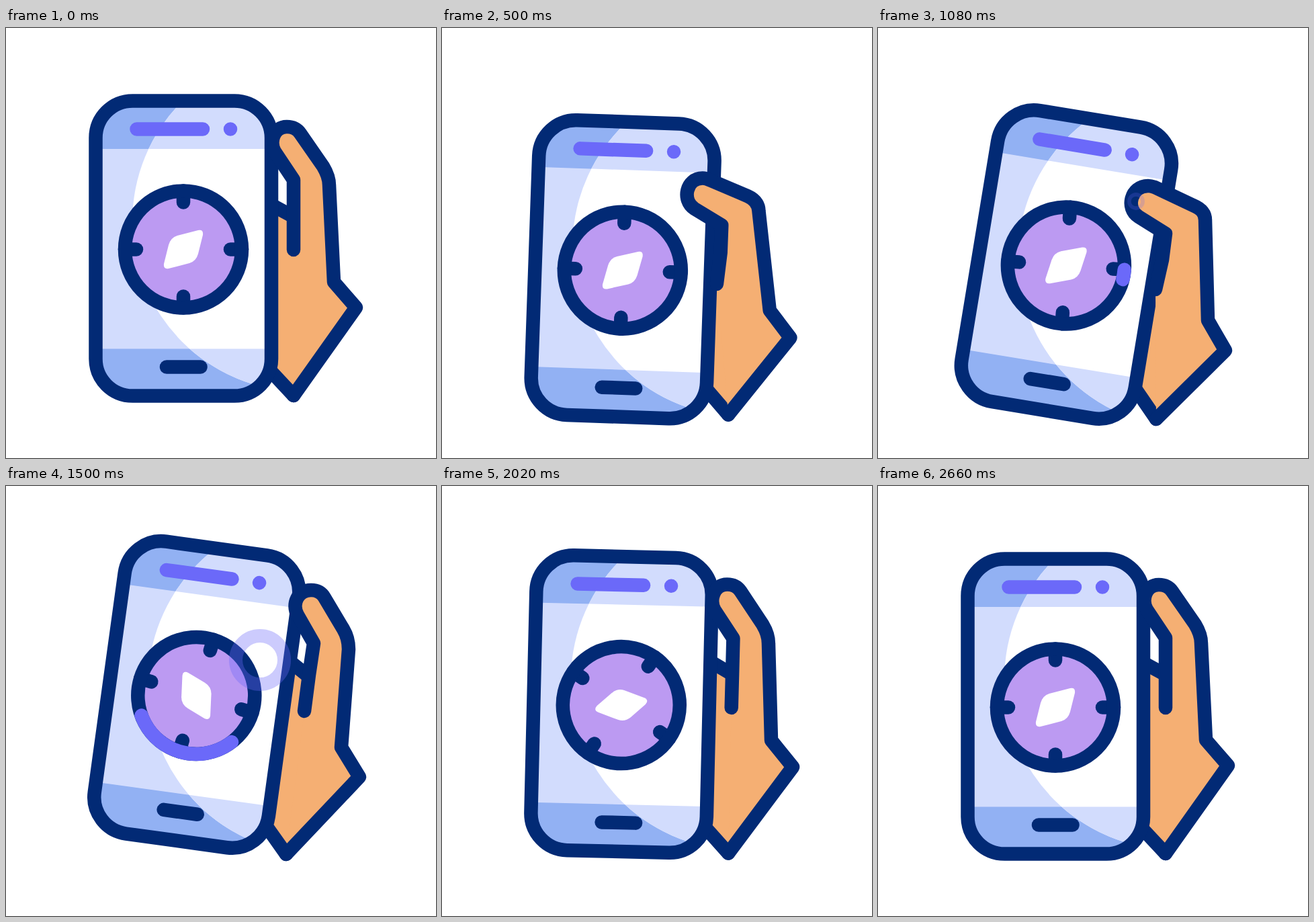
Animation, 640 px wide and 640 px high, one loop 2.82 s. Source, as an HTML page without scripts:

```html
<!DOCTYPE html>
<html lang="en">
<head>
<meta charset="utf-8">
<title>Phone compass</title>
<style>
  @property --head { syntax: "<number>"; inherits: false; initial-value: 0; }
  @property --tail { syntax: "<number>"; inherits: false; initial-value: 0; }

  :root {
    --navy: #022a75;
    --violet: #6b69f9;
    --skin: #f5af73;
    --pale: #d2dcfd;
    --blue: #92b1f3;
  }
  html, body { margin: 0; height: 100%; overflow: hidden; background: #fff; }
  svg { display: block; width: 100%; height: 100%; }

  .line { fill: none; stroke: var(--navy); stroke-width: 20.5; stroke-linecap: round; stroke-linejoin: round; }
  .line.skin { fill: var(--skin); }
  .line.violet { stroke: var(--violet); }

  .phone, .palm, .thumb, .compass, .arc, .ripple {
    animation: 2820ms linear infinite;
  }
  .phone, .compass { transform-origin: 264px 329.5px; }
  .phone { animation-name: drift, tilt; }
  .compass { animation-name: spin; }
  .palm { animation-name: palm; }
  .thumb { animation-name: thumb; }
  .arc {
    animation-name: head, tail, show;
    stroke-dasharray: calc((var(--head) - var(--tail)) * 1px) 720px;
    stroke-dashoffset: calc(var(--tail) * -1px);
  }
  .ripple { fill: none; stroke: var(--violet); stroke-width: 20; animation-name: ripple; }

  @keyframes drift {
    0%, 7.801% { translate: 0 0; animation-timing-function: cubic-bezier(.4, 0, .7, .82); }
    12.057% { translate: .5px 20.5px; animation-timing-function: cubic-bezier(.2, .55, .5, 1); }
    26.241% { translate: 6.5px 35.3px; animation-timing-function: cubic-bezier(.33, 0, .67, .17); }
    38.298% { translate: 15.9px 24px; animation-timing-function: cubic-bezier(.33, .26, .67, .62); }
    45.39% { translate: 18.5px 2px; animation-timing-function: cubic-bezier(.33, .47, .67, 1); }
    53.191% { translate: 19.3px -17.6px; animation-timing-function: cubic-bezier(.33, 0, .67, .5); }
    65.957% { translate: 6.5px -8px; animation-timing-function: cubic-bezier(.2, .8, .45, 1); }
    94.326%, 100% { translate: 0 0; }
  }
  @keyframes tilt {
    0%, 7.801% { rotate: 0deg; animation-timing-function: cubic-bezier(.39, 0, .61, 1); }
    39.716% { rotate: 9.4deg; animation-timing-function: cubic-bezier(.33, 0, .67, .31); }
    53.191% { rotate: 7.85deg; }
    65.957% { rotate: 2.8deg; animation-timing-function: cubic-bezier(.2, .66, .45, 1); }
    94.326%, 100% { rotate: 0deg; }
  }
  @keyframes spin {
    0%, 32.624% { rotate: 0deg; animation-timing-function: cubic-bezier(.33, 0, .67, .26); }
    53.191% { rotate: -80.5deg; animation-timing-function: cubic-bezier(.33, .18, .67, .8); }
    65.957% { rotate: -285.7deg; animation-timing-function: cubic-bezier(.2, .75, .45, 1); }
    94.326%, 100% { rotate: -360deg; }
  }
  @keyframes head {
    0%, 35.106% { --head: 0; animation-timing-function: cubic-bezier(.37, 0, .63, 1); }
    65.603%, 100% { --head: 360; }
  }
  @keyframes tail {
    0%, 40.78% { --tail: 0; animation-timing-function: cubic-bezier(.37, 0, .63, 1); }
    71.631%, 100% { --tail: 360; }
  }
  @keyframes show {
    0% { visibility: hidden; animation-timing-function: step-end; }
    35.3% { visibility: visible; animation-timing-function: step-end; }
    71.5%, 100% { visibility: hidden; }
  }
  @keyframes ripple {
    0%, 36.17% { transform: translate(384px, 258px) scale(.1); opacity: 0; }
    38.298% { transform: translate(384px, 258px) scale(.28); opacity: .22; }
    53.191% { transform: translate(378px, 259px) scale(1); opacity: .35; }
    60.284%, 100% { transform: translate(378px, 259px) scale(1.12); opacity: 0; }
  }

  @keyframes palm {
    0%, 7.801% {
      d: path("M428 547 L385 501 L380 255 L428 281 L460 330");
      animation-timing-function: cubic-bezier(.4, 0, .7, .82);
    }
    12.057% {
      d: path("M430 561 L385 513 L385 275 L417 293 L450 340");
      animation-timing-function: cubic-bezier(.2, .5, .6, 1);
    }
    23.404% {
      d: path("M425 580 L385 532 L383 310 L414 335 L445 360");
      animation-timing-function: cubic-bezier(.4, 0, .6, 1);
    }
    38.298% {
      d: path("M414 582 L379 531 L390 320 L423 345 L455 380");
      animation-timing-function: cubic-bezier(.4, 0, .6, 1);
    }
    53.191% {
      d: path("M417 548 L383 500 L410 251 L451 284 L480 330");
      animation-timing-function: cubic-bezier(.33, 0, .67, .6);
    }
    65.957% {
      d: path("M424 546 L386 501 L395 252 L437 280 L470 330");
      animation-timing-function: cubic-bezier(.2, .75, .45, 1);
    }
    94.326%, 100% { d: path("M428 547 L385 501 L380 255 L428 281 L460 330"); }
  }
  @keyframes thumb {
    0%, 7.801% {
      d: path("M428 330 L428 281 L428 226 L400 184 C392 170 398 147 418 147 C428 147 434 151 438 157 L472 206 C478 216 481 224 481 234 L488 378 L521 416 L428 547");
      animation-timing-function: cubic-bezier(.4, 0, .7, .82);
    }
    12.057% {
      d: path("M415 358 L417 315 L417 266 L380 235 C366 222 373 193 394 193 C400 193 404 195 408 198 L455 228 C464 235 469 244 470 256 L487 399 L520 438 L430 561");
      animation-timing-function: cubic-bezier(.2, .5, .6, 1);
    }
    23.404% {
      d: path("M407 388 L414 340 L416 302 L374 279 C354 267 360 233 386 233 C390 233 393 234 396 235 L455 257 C466 261 472 268 472 278 L488 427 L518 468 L425 580");
      animation-timing-function: cubic-bezier(.4, 0, .6, 1);
    }
    38.298% {
      d: path("M413 389 L423 345 L428 306 L388 281 C368 269 376 235 402 235 C406 235 409 236 412 237 L469 264 C481 269 487 275 487 286 L491 435 L517 480 L414 582");
      animation-timing-function: cubic-bezier(.4, 0, .6, 1);
    }
    53.191% {
      d: path("M444 335 L451 281 L458 234 L434 192 C425 176 434 155 454 155 C464 155 470 159 474 166 L502 213 C508 223 510 232 510 243 L499 389 L526 433 L417 548");
      animation-timing-function: cubic-bezier(.33, 0, .67, .6);
    }
    65.957% {
      d: path("M434 330 L437 279 L440 228 L413 186 C404 170 412 146 432 146 C442 146 448 150 452 156 L484 207 C490 217 492 225 492 235 L492.5 379 L523.5 421 L424 546");
      animation-timing-function: cubic-bezier(.2, .75, .45, 1);
    }
    94.326%, 100% {
      d: path("M428 330 L428 281 L428 226 L400 184 C392 170 398 147 418 147 C428 147 434 151 438 157 L472 206 C478 216 481 224 481 234 L488 378 L521 416 L428 547");
    }
  }
</style>
</head>
<body>
<svg viewBox="0 0 640 640">
  <defs>
    <rect id="body" x="133.5" y="108.5" width="261.5" height="439" rx="55"/>
    <clipPath id="screen"><use href="#body"/></clipPath>
    <clipPath id="glare"><circle cx="441" cy="288" r="253"/></clipPath>
    <path id="bands" d="M130 105H400V180H130ZM130 477.5H400V552H130Z"/>
    <path id="tick" d="M264 242.5V259.5"/>
  </defs>

  <path class="line skin palm"/>

  <g class="phone">
    <g clip-path="url(#screen)">
      <path d="M130 105H400V552H130Z" fill="var(--pale)"/>
      <use href="#bands" fill="var(--blue)"/>
      <g clip-path="url(#glare)">
        <path d="M130 105H400V552H130Z" fill="#fff"/>
        <use href="#bands" fill="var(--pale)"/>
      </g>
    </g>
    <use href="#body" class="line"/>
    <path class="line violet" d="M194.5 150.5H293M334 150.5h.01"/>
    <path class="line" d="M239 504.5H289.5"/>

    <g class="compass">
      <circle cx="264" cy="329.5" r="87" fill="#bc9af2"/>
      <g class="line">
        <use href="#tick"/>
        <use href="#tick" transform="rotate(90 264 329.5)"/>
        <use href="#tick" transform="rotate(180 264 329.5)"/>
        <use href="#tick" transform="rotate(270 264 329.5)"/>
        <circle cx="264" cy="329.5" r="87"/>
      </g>
      <path fill="#fff" d="M255 309L286 301Q294 299.5 293 308L286 336Q283 347 273 350L242 358Q234 359.5 235 351L242 323Q245 312 255 309Z"/>
      <circle class="line violet arc" cx="264" cy="329.5" r="87" pathLength="360"/>
    </g>
  </g>

  <path class="line skin thumb"/>
  <circle class="ripple" r="36"/>
</svg>
</body>
</html>
```
